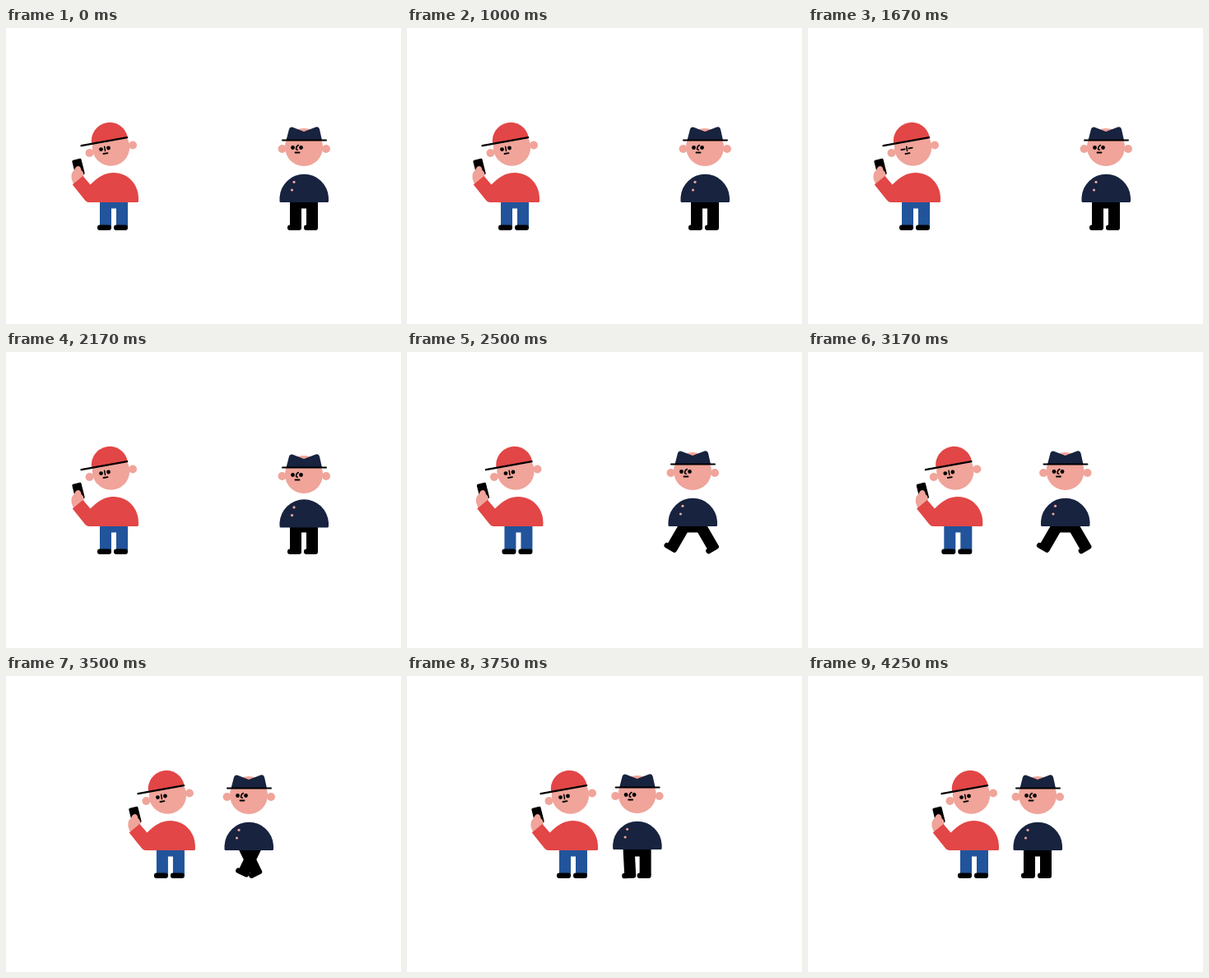
An HTML page that plays this animation: 480x360 px, repeating every 5000 ms.

```html
<!DOCTYPE html>
<html lang="en">
<head>
<meta charset="utf-8">
<title>Two passers-by</title>
<style>
  html, body { margin: 0; width: 100%; height: 100%; overflow: hidden; background: #fff; }
  svg { display: block; width: 100vw; height: 100vh; }
  .skin { fill: #f0a49a; }
  .red { fill: #e24646; }
  .navy { fill: #17233f; }
  .jeans { fill: #21549b; }
  .line { fill: none; stroke: #000; stroke-width: 1.8; stroke-linecap: round; stroke-linejoin: round; }
  .shut { visibility: hidden; }
  .blink .shut { visibility: visible; }
  .blink .open { visibility: hidden; }
</style>
</head>
<body>
<svg viewBox="0 0 480 360">
  <defs>
    <!-- hip at 0,0 -->
    <path id="leg" d="M-7-5H7V30H-7Z"/>
    <rect id="shoe" x="-10" y="27.5" width="17" height="6.5" rx="3"/>
  </defs>

  <g id="boy">
    <g class="jeans">
      <path d="M121 207h20v12.500h-20z"/>
      <use href="#leg" x="121" y="212"/>
      <use href="#leg" x="141" y="212"/>
    </g>
    <use href="#shoe" x="121" y="212"/>
    <use href="#shoe" x="141" y="212"/>
    <rect x="-5.700" y="-10" width="11.400" height="20" rx="1.500" transform="translate(88 169.500) rotate(-14)"/>
    <path class="skin" d="M82 190L79.500 183Q79 175 83 173Q84.500 168 88 168Q91 168.500 91.500 173Q94.500 175 94.500 179L94 183Z"/>
    <path class="red" d="M101 212Q98 212 96 209.500L80.800 190.500L93.500 180L102.500 190.500C112 181 120 176 131 176C148 176 161 190 161 207V210.500Q161 212 159.500 212Z"/>
    <circle class="skin" cx="101.500" cy="152" r="5"/>
    <circle class="skin" cx="154" cy="142.500" r="5"/>
    <circle class="skin" cx="127.500" cy="145" r="22.700"/>
    <path class="red" d="M104.200 141A22 22 0 0 1 147.800 133Z"/>
    <path class="line" style="stroke-width:2.200" d="M91.500 143.200L147.200 133.200"/>
    <g class="open">
      <circle cx="115.500" cy="147.600" r="2.400"/>
      <circle cx="124.500" cy="146" r="2.400"/>
    </g>
    <path class="line shut" d="M113.300 148.100l4.400-.8M122.300 146.500l4.400-.8"/>
    <path class="line" style="stroke-width:1.500" d="M119.700 144.300l.8 5.200"/>
    <path class="line" d="M118.500 153l5-.9"/>
  </g>

  <g id="man">
    <g id="hips">
      <path id="seat" d="M-10-5h20V7.500h-20z"/>
      <g id="left"><use href="#leg"/><use href="#shoe"/></g>
      <g id="right"><use href="#leg"/><use href="#shoe"/></g>
    </g>
    <g id="coat">
      <path class="navy" d="M334 212Q332.500 212 332.500 210.500V206A29.800 30 0 0 1 392 206V210.500Q392 212 390.500 212Z"/>
      <circle class="skin" cx="350" cy="187.300" r="1.600"/>
      <circle class="skin" cx="347.500" cy="197" r="1.600"/>
    </g>
    <g id="head">
      <circle class="skin" cx="335.600" cy="147" r="5"/>
      <circle class="skin" cx="389" cy="147" r="5"/>
      <circle class="skin" cx="362" cy="145" r="23"/>
      <path class="navy" d="M340.500 136.500L344 123Q345 119.500 348.500 120.700L362 126L376.500 120.500Q380 119.500 381 123L384 136.500Z"/>
      <path class="line" style="stroke-width:2" d="M336 136.500H389"/>
      <g class="open">
        <circle cx="348.500" cy="145.500" r="2.400"/>
        <circle cx="358.500" cy="145.500" r="2.400"/>
      </g>
      <path class="line shut" d="M346.300 145.500h4.400M356.300 145.500h4.400"/>
      <path class="line" style="stroke-width:1.500" d="M355.300 142.500Q352.300 144 352.600 147.500L354.300 148.300"/>
      <path class="line" d="M351.500 151.500h5"/>
    </g>
  </g>
</svg>
<script>
const FPS = 12, LOOP = 5000;
const $ = id => document.getElementById(id);
const move = (id, x, y, turn = 0) =>
  $(id).setAttribute('transform', `translate(${x} ${y}) rotate(${turn})`);

// Walk: one cycle is two strides of four drawings each
const START = 26, END = 46;
const strides = [0, -15, -32, -49.5, -67, -83];
const push = [0, 0.78, 0.9, 0.96];
const bounce = [0, -3, -2.5, -1];
const leftTurn = [30, 10, -6, -18, -26, -19, -2, 16];
const rightTurn = [-30, -12, 4, 16, 26, 1, -10, -24];

const dips = { 24: 1.5, 25: 3, 26: 4, 27: 1 };
const firstStep = { 27: [13, -9], 28: [21, -18], 29: [27, -25] };
const lastStep = { 44: [-8, 0], 45: [-3, 0] };

const blinks = (n, starts) => starts.some(s => n >= s && n < s + 3);

function boyX(n) {
  const p = Math.min(1, Math.max(0, (n - 27.35) / 16.46));
  return 71 * (1 - Math.cos(Math.PI * p)) / 2;
}

function manPose(n) {
  if (n <= START) return { x: 0, y: dips[n] || 0, l: 0, r: 0 };
  if (n >= END) return { x: strides[5], y: 0, l: 0, r: 0 };
  const step = Math.floor((n - START) / 4), i = (n - START) % 4;
  const x = strides[step] + (strides[step + 1] - strides[step]) * push[i];
  const k = (n - START + 4) % 8;
  const [l, r] = firstStep[n] || lastStep[n] || [leftTurn[k], rightTurn[k]];
  return { x, y: dips[n] || bounce[i], l, r };
}

function draw(now) {
  const n = Math.floor(((now + 4) % LOOP) * FPS / 1000);
  move('boy', boyX(n), 0);
  $('boy').classList.toggle('blink', blinks(n, [5, 20, 35]));

  const { x, y, l, r } = manPose(n);
  const sink = y > 0 ? y * 0.4 : y;
  const cross = Math.max(0, Math.min(-l, r)) / 26;
  const hip = 10 - 4.5 * cross;
  move('man', x, 0);
  move('hips', 362 + 1.5 * cross, 212);
  move('left', -hip, 0, l);
  move('right', hip, 0, r);
  $('seat').setAttribute('transform', `scale(${hip / 10} 1)`);
  move('coat', 0, sink);
  move('head', 0, y);
  $('man').classList.toggle('blink', blinks(n, [9, 48]));
}

const begin = performance.now();
function tick() {
  draw(performance.now() - begin);
  requestAnimationFrame(tick);
}
tick();
</script>
</body>
</html>
```
